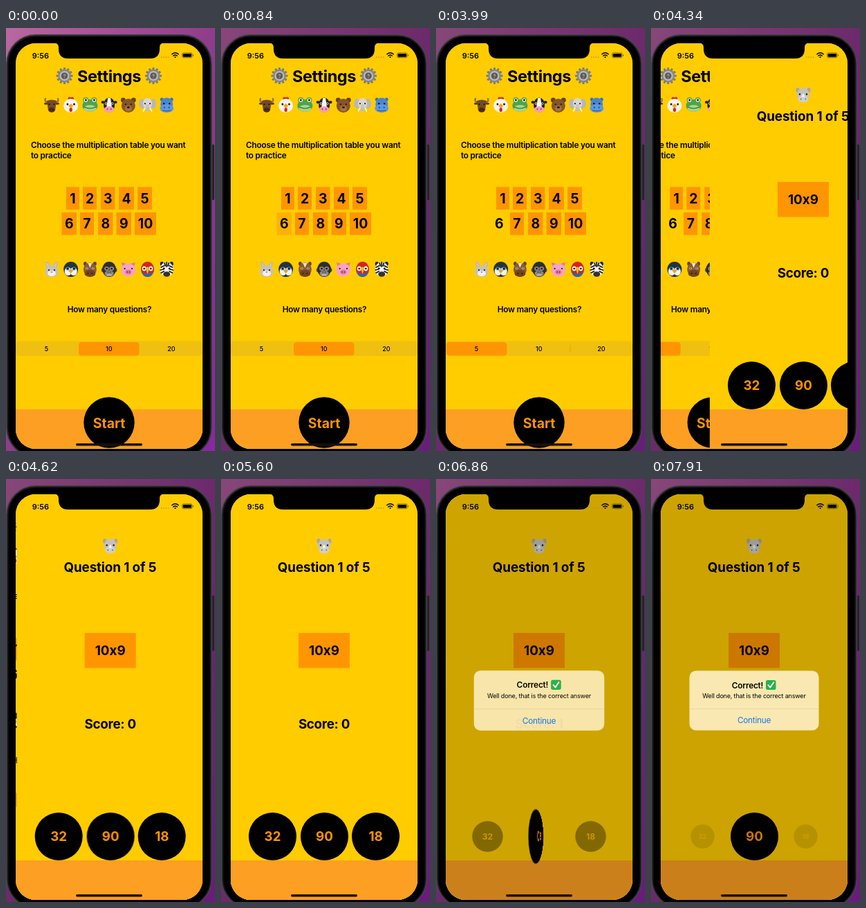
An HTML page for the animation above (8 s loop, 302 by 610 pixels).

```html
<!DOCTYPE html>
<html lang="en">
<head>
<meta charset="utf-8">
<title>Multiplication practice</title>
<style>
html, body { margin: 0; width: 100%; height: 100%; overflow: hidden; background: #7c2f6e; }
#stage { position: relative; width: 302px; height: 610px; overflow: hidden; font-family: Inter, Roboto, sans-serif; }
svg, .page { position: absolute; left: 0; top: 0; width: 302px; height: 610px; display: block; }
#screen { position: absolute; left: 14px; top: 22px; width: 270px; height: 585px; overflow: hidden; border-radius: 29px; background: #fc0; }
#inner { position: absolute; left: -14px; top: -22px; width: 302px; height: 610px; }
.ball { position: absolute; top: 481px; width: 69px; height: 69px; border-radius: 50%; background: #000; color: #ff9500;
  font-size: 18.8px; font-weight: 700; line-height: 69px; text-align: center; }
#dim { position: absolute; inset: 0; background: #000; }
</style>
</head>
<body>
<div id="stage">
  <svg id="case"></svg>
  <div id="screen"><div id="inner">
    <div class="page" id="settings"><svg></svg></div>
    <div class="page" id="quiz"><svg></svg></div>
    <div id="dim"></div>
    <svg id="alert"></svg>
  </div></div>
  <svg id="chrome"></svg>
</div>
<script>
const $ = s => document.querySelector(s);

// ---- drawing helpers
const rect = (x, y, w, h, fill, r = 0, more = '') =>
  `<rect x="${x}" y="${y}" width="${w}" height="${h}" rx="${r}" fill="${fill}" ${more}/>`;
const oval = (x, y, rx, ry, fill) => `<ellipse cx="${x}" cy="${y}" rx="${rx}" ry="${ry}" fill="${fill}"/>`;
const disc = (x, y, r, fill) => oval(x, y, r, r, fill);
const path = (d, fill) => `<path d="${d}" fill="${fill}"/>`;
const line = (d, color, w) => `<path d="${d}" fill="none" stroke="${color}" stroke-width="${w}" stroke-linecap="round" stroke-linejoin="round"/>`;
const pair = (x, y, rx, ry, fill) => oval(-x, y, rx, ry, fill) + oval(x, y, rx, ry, fill);
const at = (x, y, body) => `<g transform="translate(${x} ${y})">${body}</g>`;
// y is the middle of the capital height
const text = (x, y, size, str, { w = 700, fill = '#000', ls = 0, anchor = 'middle', id = '' } = {}) =>
  `<text x="${x}" y="${y + size * .364}" font-size="${size}" font-weight="${w}" fill="${fill}"
    letter-spacing="${ls}" text-anchor="${anchor}" ${id && `id="${id}"`}>${str}</text>`;

const eyes = (x, y, r = 1.1) => pair(x, y, r, r, '#111');
const whiteEyes = (x, y, r = 2.2) => pair(x, y, r, r, '#fff') + eyes(x, y, r * .55);

const animals = {
  buffalo: line('M-9-9Q-11-4-5-4H5Q11-4 9-9', '#8f7350', 2.4) + pair(8, -2, 3, 1.6, '#5a371c') +
    path('M-7-6Q0-9 7-6L5 8Q0 13-5 8Z', '#744a25') + oval(0, 7, 4.4, 3.6, '#4b2f1b') +
    eyes(3.4, -1) + pair(1.8, 6.5, .8, .8, '#1d120a'),
  hen: disc(-2, -9, 2.4, '#d8261c') + disc(2, -9, 2.4, '#d8261c') + oval(0, 1, 10.5, 10, '#f7f3ec') +
    eyes(4.8, -1, 1.4) + path('M-3.5 1L0-2 3.5 1 0 5Z', '#f6a21b') + oval(0, 7, 2.2, 3, '#d8261c'),
  frog: pair(6, -7, 4, 4, '#4fa34c') + oval(0, 1, 11, 9, '#4fa34c') + oval(0, 5, 9, 5, '#a5d48a') +
    whiteEyes(6, -7, 2.6) + line('M-8 3Q0 7 8 3', '#245f2a', 1.1),
  cow: pair(9, -4, 2.6, 2, '#2b2626') + oval(0, 0, 8, 10.5, '#25211f') +
    path('M-2-10H2L4 4H-4Z', '#f6f3ef') + oval(0, 6.5, 7.5, 4.6, '#f3a0b4') +
    whiteEyes(4.6, -2, 1.8) + pair(2.6, 6, 1, 1.2, '#9c4860'),
  bear: pair(7.5, -7, 3.4, 3.4, '#6b421f') + oval(0, 1, 10, 10, '#85552b') + oval(0, 5, 5, 4.2, '#a4743f') +
    eyes(4, -1) + oval(0, 3.4, 2, 1.4, '#20140b'),
  elephant: pair(8, -2, 4.4, 7, '#b9b6b4') + oval(0, -2, 6.5, 8, '#d9d7d4') +
    line('M0 1V9', '#cac7c4', 4.6) + line('M-2 5H2M-2 8H2', '#aaa6a3', .7) + eyes(3.6, -2) + line('M-4 5L-6 9M4 5L6 9', '#fff', 1.6),
  hippo: pair(7, -8, 2.4, 2.6, '#3a6fb8') + oval(0, -1, 9, 9.5, '#4a86cf') + oval(0, 5, 10, 6, '#5b98df') +
    eyes(4, -2, 1.3) + pair(3.4, 3.6, 1, 1.2, '#234b85') + line('M-6 8Q0 9.5 6 8', '#234b85', .9),
  rabbit: `<g transform="rotate(-22)">${oval(-3, -8, 2.6, 5, '#b8b6b2')}${oval(-3, -8, 1.2, 3.4, '#e8bfc0')}</g>` +
    `<g transform="rotate(22)">${oval(3, -8, 2.6, 5, '#b8b6b2')}${oval(3, -8, 1.2, 3.4, '#e8bfc0')}</g>` +
    oval(0, 3, 10, 8, '#c4c2bd') + oval(0, 6, 6, 4, '#f2f0ec') + eyes(4, 1) + oval(0, 4, 1.3, 1, '#d77'),
  penguin: oval(0, 0, 10.5, 11, '#26323c') + pair(4, 3, 5, 6, '#f4f4f2') + pair(4.6, -1, 2.5, 2.5, '#3c9bd0') +
    eyes(4.6, -1, 1.4) + path('M-3.5 2L0-1 3.5 2 0 6Z', '#f4a11f'),
  horse: pair(7, -8, 2.4, 3, '#6a4324') + oval(0, 0, 9.5, 9.5, '#8a5a30') + path('M-3-9L0-2 3-9Z', '#f0e4cf') +
    oval(0, 6, 8, 5, '#70431f') + whiteEyes(4.5, -1.5, 1.6) + pair(3, 6, 1, 1.1, '#2e1a0c'),
  gorilla: pair(9, 1, 2.4, 3, '#55504f') + oval(0, 0, 10, 11, '#2f2d2e') + oval(0, 6, 6.6, 4.6, '#8b8583') +
    pair(3.6, -1, 3.4, 3, '#8b8583') + eyes(3.6, -1, 1.3) + pair(1.6, 4, .9, .8, '#222') + line('M-3 8H3', '#eee', 1.2),
  pig: path('M-10-10L-3-8-8-2ZM10-10L3-8 8-2Z', '#e2769f') + oval(0, 1, 10.5, 9.5, '#f6a3c4') +
    oval(0, 4, 4.6, 3.4, '#e5799f') + pair(1.7, 4, .9, 1.4, '#8f3559') + eyes(5.2, -1),
  parrot: oval(0, 0, 9.5, 11, '#d4241f') + path('M-9 3Q-6 11 0 11Q6 11 9 3L4 6H-4Z', '#2468b6') +
    pair(4.8, -1, 3, 3.4, '#f6efe4') + eyes(4.8, -1, 1.3) + path('M-3-2Q0-5 3-2L0 7Z', '#f2b52a'),
  zebra: pair(7, -8, 2.6, 3, '#222') + oval(0, 0, 9.5, 10.5, '#f3f1ee') +
    line('M-8-3L-4-5M8-3L4-5M-9 1L-5 0M9 1L5 0M-8 5L-4 3M8 5L4 3M0-10V-4M-3-9L-2-5M3-9L2-5', '#1c1a1a', 1.8) +
    oval(0, 7, 5, 3.8, '#343131') + eyes(4, -1, 1.4),
  rhino: pair(8, -7, 2.6, 3.6, '#a9a8a6') + oval(0, 0, 9, 10, '#c3c2bf') + oval(0, 6, 7.5, 5, '#d0cfcc') +
    path('M-2 3Q0-7 2 3Z', '#f7f5ef') + eyes(5, -1, 1.2) + pair(3.4, 6, .9, .9, '#666')
};
const herd = (y, names) => names.split(' ').map((n, i) => at(66 + i * 27.7, y, animals[n])).join('');

const gear = () => {
  let teeth = '';
  for (let i = 0; i < 12; i++) teeth += rect(-1.5, -12, 3, 5, '#77797c', .8, `transform="rotate(${i * 30})"`);
  return teeth + disc(0, 0, 9.4, '#85878a') + disc(0, 0, 7, '#b9bbbd') + disc(0, 0, 4.8, '#5d5a57') +
    line('M-1.3-1.2Q0-3.2 1.3-1.4Q1.3 0 0 .8M0 2.7V2.8', '#d4b98b', 1);
};

// ---- phone body and wallpaper
$('#case').innerHTML = `<defs>
  <linearGradient id="wall" x1="0" y1="0" x2="1" y2="1"><stop offset="0" stop-color="#b9689f"/>
  <stop offset=".5" stop-color="#8f3c8c"/><stop offset="1" stop-color="#8a27a3"/></linearGradient></defs>` +
  rect(0, 0, 302, 610, 'url(#wall)') + `<g id="shade">${rect(0, 0, 302, 610, '#2d0a33')}</g>` +
  rect(296, 168, 5, 80, '#252427', 1.5) +
  rect(.8, 9.8, 296.4, 609, '#1b1a1c', 42, 'stroke="#48464b" stroke-width="1.4"') +
  rect(3.5, 12.5, 291, 604, '#000', 39);

// ---- settings page
const box = (x, y, w, n) => `<g>${rect(x, y, w, 32.5, '#ff9500', 0, n == 6 ? 'id="six"' : '')}${text(x + w / 2, y + 16.3, 19.4, n)}</g>`;
const rows = [
  [229.3, [[87, 19], [111, 20], [137, 20.5], [163, 22], [190, 21]]],
  [266, [[80.5, 21.5], [107, 20], [133, 21.5], [159.5, 21.5], [186, 31]]]
];
const base = rect(14, 0, 270, 610, '#fc0') + rect(14, 550, 270, 60, '#fd9f22');
const body = { w: 600, ls: -.21 };
$('#settings svg').innerHTML = base +
  at(84.5, 69, gear()) + at(213, 69, gear()) + text(149, 69, 23.5, 'Settings', { ls: -.4 }) +
  herd(111, 'buffalo hen frog cow bear elephant hippo') +
  text(36, 168.5, 11.8, 'Choose the multiplication table you want', { ...body, anchor: 'start' }) +
  text(36, 183.5, 11.8, 'to practice', { ...body, anchor: 'start' }) +
  rows.map(([y, cells], r) => cells.map(([x, w], i) => box(x, y, w, r * 5 + i + 1)).join('')).join('') +
  herd(348, 'rabbit penguin horse gorilla pig parrot zebra') +
  text(149.5, 405.5, 11.8, 'How many questions?', body) +
  rect(14, 451.5, 270, 21.5, '#efc010', 5) +
  rect(193.5, 457, 1, 10.5, '#d3a714', 0, 'id="split"') +
  rect(105, 453, 87.5, 19.5, '#ff9500', 4.5, 'id="pill"') +
  ['5', '10', '20'].map((s, i) => text(58.5 + i * 90.2, 462.5, 9, s, { w: 500 })).join('') +
  disc(149, 569, 36.7, '#000') + text(149, 569.5, 19.4, 'Start', { fill: '#ff9500' });

// ---- question page
$('#quiz svg').innerHTML = base + at(149, 96.5, animals.rhino) +
  text(148.7, 127, 18.8, 'Question 1 of 5', { ls: -.1 }) +
  rect(112, 222, 74, 50.5, '#ff9500') + text(149, 247.5, 18.8, '10x9') +
  text(149, 353.5, 18.8, 'Score: 0', { ls: -.3, id: 'score' });
const balls = [[74.5, 32], [149, 90], [223.7, 18]].map(([x, n]) => {
  const b = document.createElement('div');
  b.className = 'ball';
  b.style.left = x - 34.5 + 'px';
  b.textContent = n;
  $('#quiz').append(b);
  return b;
});

// ---- alert
$('#alert').innerHTML = '<g id="card">' + rect(55.5, 276.5, 187, 86, '#f9e8b1', 9.5) +
  rect(55.5, 331.3, 187, .7, '#dfd09d') +
  text(139.5, 297.3, 11.8, 'Correct!', { w: 600, ls: -.2 }) +
  rect(166, 290, 14.5, 14, '#27b24a', 2.5) + line('M169.5 297.3L172.3 300.5 177.3 293.2', '#fff', 2) +
  text(149, 312.3, 9, 'Well done, that is the correct answer', { w: 400, ls: -.17 }) +
  text(149, 348, 11.8, 'Continue', { w: 400, fill: '#1877f2', ls: -.25 }) + '</g>';

// ---- notch, status bar, home indicator
$('#chrome').innerHTML =
  path('M70 21.5Q76 22 76 28V30Q76 44 90 44H208Q222 44 222 30V28Q222 22 228 21.5Z', '#000') +
  text(50, 39.5, 11, '9:56', { w: 600 }) +
  [0, 1, 2, 3].map(i => disc(224.7 + i * 3.3, 42, .8, '#b28f05')).join('') +
  line('M239.8 37.8Q244.5 33.8 249.2 37.8M241.7 40Q244.5 37.8 247.3 40', '#000', 1.5) + disc(244.5, 42, 1.1, '#000') +
  rect(254.5, 35.8, 14.6, 7, 'none', 2, 'stroke="#5c4a00" stroke-width=".7"') +
  rect(255.6, 36.9, 12.4, 4.8, '#000', 1.2) + rect(269.8, 38.2, 1, 2.4, '#5c4a00', .5) +
  rect(101, 599, 96, 3.4, '#17110a', 1.7);

// ---- motion
const LOOP = 8000;
const clamp = v => Math.min(1, Math.max(0, v));
const spring = (t, start, speed) => {
  const a = Math.max(0, t - start) * speed;
  return 1 - (1 + a) * Math.exp(-a);
};
// cubic-bezier(.42, 0, .58, 1), solved by bisection
const ease = p => {
  p = clamp(p);
  let lo = 0, hi = 1, s = p;
  for (let i = 0; i < 24; i++) {
    s = (lo + hi) / 2;
    const x = 1.26 * s * (1 - s) * (1 - s) + 1.74 * s * s * (1 - s) + s ** 3;
    x < p ? lo = s : hi = s;
  }
  return s * s * (3 - 2 * s);
};

const TAP = 6610;
const el = Object.fromEntries(['shade', 'six', 'pill', 'split', 'settings', 'quiz', 'score', 'dim', 'card'].map(k => [k, $('#' + k)]));

function render(t) {
  el.shade.style.opacity = .35 * ease((t - 470) / 300);
  el.six.style.opacity = 1 - ease((t - 600) / 480);

  const slide = spring(t, 3050, .016);
  el.pill.setAttribute('x', 105 - 90 * slide);
  el.split.style.opacity = slide;

  const push = spring(t, 4180, .0163);
  el.settings.style.transform = `translateX(${-81 * push}px)`;
  el.quiz.style.transform = `translateX(${270 * (1 - push)}px)`;
  el.quiz.style.visibility = t < 4180 ? 'hidden' : 'visible';

  el.score.textContent = t < TAP ? 'Score: 0' : 'Score: 1';
  const turn = ease((t - TAP) / 400);
  balls.forEach((b, i) => {
    if (i === 1) b.style.transform = turn % 1 ? `perspective(70px) rotateY(${360 * turn}deg)` : 'none';
    else {
      b.style.transform = `scale(${1 - turn / 2})`;
      b.style.opacity = 1 - .9 * turn;
    }
  });

  const pop = spring(t, TAP, .0203);
  el.dim.style.opacity = .2 * pop;
  el.card.style.opacity = pop;
  const k = 1.2 - .2 * pop;
  el.card.setAttribute('transform', `translate(149 319.5) scale(${k}) translate(-149 -319.5)`);
}

const begin = performance.now();
function tick() {
  render((performance.now() - begin) % LOOP);
  requestAnimationFrame(tick);
}
tick();
</script>
</body>
</html>
```
